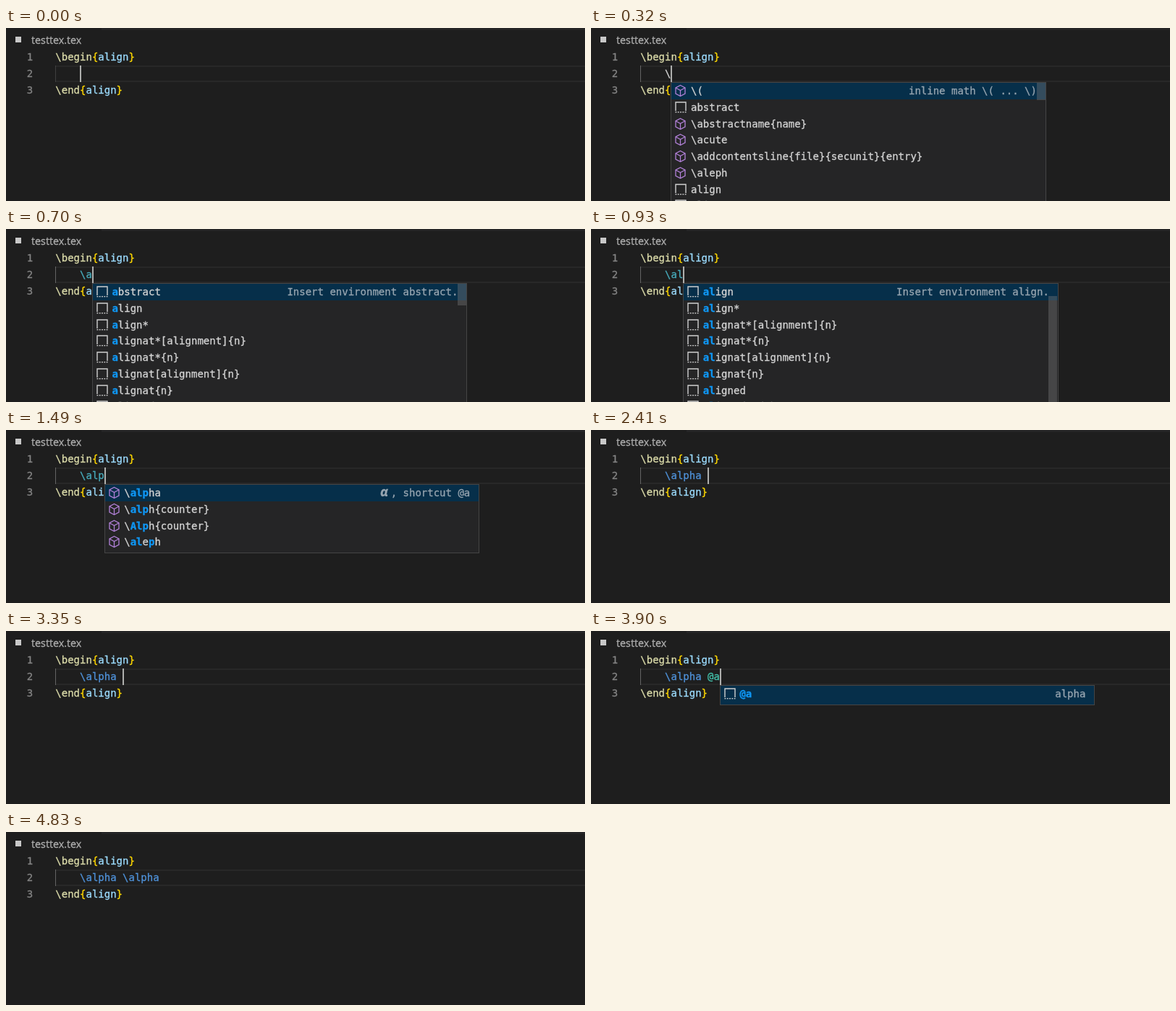
An HTML page with a canvas that plays this animation: 800x240 px, repeating every 4.91 s.

```html
<!DOCTYPE html>
<html lang="en">
<head>
<meta charset="utf-8">
<title>LaTeX completion</title>
<style>
  html, body { margin: 0; width: 800px; height: 240px; overflow: hidden; background: #1e1e1e; }
  canvas { display: block; }
</style>
</head>
<body>
<canvas id="stage" width="800" height="240"></canvas>
<script>
const ctx = document.getElementById('stage').getContext('2d');
const LOOP = 4910, ADV = 8.43, LEFT = 68.6, PITCH = 22.75;
const MONO = '14px "DejaVu Sans Mono", monospace';
const CMD = '#dcdcaa', BRACE = '#ffd700', NAME = '#9cdcfe';
const PLAIN = '#d4d4d4', TEAL = '#47acbc', BLUE = '#4f92da', MINT = '#43c3ac';

const colX = col => LEFT + col * ADV;

// Rows starting with a backslash get the cube icon, others the snippet icon.
const envs = ['align', 'align*', 'alignat*[alignment]{n}', 'alignat*{n}',
  'alignat[alignment]{n}', 'alignat{n}', 'aligned', 'alignedat{n}'];
const greek = ['\\alpha', '\\alph{counter}', '\\Alph{counter}', '\\aleph'];
const shortcut = ', shortcut @a';

const all = { col: 5, query: '', detail: 'inline math \\( ... \\)', slider: [76, 24],
  rows: ['\\(', 'abstract', '\\abstractname{name}', '\\acute',
    '\\addcontentsline{file}{secunit}{entry}', '\\aleph', 'align', 'align*'] };
const listA = { col: 6, query: 'a', detail: 'Insert environment abstract.', slider: [76, 30],
  rows: ['abstract', ...envs.slice(0, 7)] };
const listAl = { col: 7, query: 'al', detail: 'Insert environment align.', slider: [93, 147], rows: envs };
const listAlp = { col: 8, query: 'alp', detail: shortcut, alpha: true, rows: greek };
const listAlph = { ...listAlp, col: 9, query: 'alph' };
const listAlpha = { ...listAlp, col: 10, query: 'alpha', rows: ['\\alpha'] };
const listAt = { col: 13, query: '@a', detail: 'alpha', rows: ['@a'] };

// [start time, typed parts, popup, cursor visible]
const states = [
  [0, [], null, true],
  [150, [['\\', PLAIN]], null, true],
  [240, [['\\', PLAIN]], { ...all, detail: '' }, true],
  [320, [['\\', PLAIN]], all, true],
  [700, [['\\a', TEAL]], listA, true],
  [930, [['\\al', TEAL]], listAl, true],
  [1400, [['\\alp', TEAL]], listAl, true],
  [1490, [['\\alp', TEAL]], listAlp, true],
  [1800, [['\\alph', TEAL]], listAlph, true],
  [1950, [['\\alpha', BLUE]], listAlph, true],
  [2030, [['\\alpha', BLUE]], listAlpha, true],
  [2410, [['\\alpha ', BLUE]], null, true],
  [2880, [['\\alpha ', BLUE]], null, false],
  [3350, [['\\alpha ', BLUE]], null, true],
  [3580, [['\\alpha ', BLUE], ['@', MINT]], null, true],
  [3900, [['\\alpha ', BLUE], ['@a', MINT]], listAt, true],
  [4360, [['\\alpha \\alpha', BLUE]], null, true],
  [4830, [['\\alpha \\alpha', BLUE]], null, false]
];

function box(x, y, w, h, color) {
  ctx.fillStyle = color;
  ctx.fillRect(x, y, w, h);
}

// A hairline outline gives the letters a medium weight.
function text(str, x, y, color, font = MONO, align = 'left') {
  ctx.font = font;
  ctx.textAlign = align;
  ctx.fillStyle = ctx.strokeStyle = color;
  ctx.lineWidth = .3;
  ctx.fillText(str, x, y);
  ctx.strokeText(str, x, y);
}

function codeLine(parts, col, y) {
  for (const [str, color] of parts) {
    text(str, colX(col) - .3, y, color);
    col += str.length;
  }
  return col;
}

function line(points, color, width) {
  ctx.strokeStyle = color;
  ctx.lineWidth = width;
  ctx.beginPath();
  points.forEach(([x, y]) => ctx.lineTo(x, y));
  ctx.stroke();
}

function cubeIcon(x, y) {
  const color = '#b180d7', w = 6.5;
  line([[x, y - 7.5], [x + w, y - 4], [x + w, y + 4], [x, y + 7.5],
    [x - w, y + 4], [x - w, y - 4], [x, y - 7.5], [x + w, y - 4]], color, 1.3);
  line([[x - w, y - 4], [x, y - .5], [x + w, y - 4]], color, 1.3);
  line([[x, y - .5], [x, y + 7.5]], color, 1.3);
}

function snippetIcon(x, y) {
  const color = '#d0d0d0';
  line([[x - 6.5, y + 5], [x - 6.5, y - 7], [x + 7.5, y - 7], [x + 7.5, y + 5]], color, 1.4);
  for (let i = 0; i < 5; i++) box(x - 7 + i * 3.3, y + 6, 1.8, 1.4, color);
}

function label(str, query, x, y) {
  let hit = 0;
  [...str].forEach((ch, i) => {
    const match = hit < query.length && ch.toLowerCase() === query[hit];
    if (match) hit++;
    text(ch, x + i * ADV, y, match ? '#0f97f5' : PLAIN, match ? 'bold ' + MONO : MONO);
  });
}

function popup({ col, query, rows, detail, alpha, slider }) {
  const left = colX(col), x = Math.floor(left), right = Math.floor(left + 518.4);
  const n = rows.length, bottom = n === 1 ? 103 : n === 4 ? 171 : 260;
  box(x, 75, right - x, bottom - 75, '#454545');
  box(x + 1, 76, right - x - 2, bottom - 77, '#252526');
  box(x + 1, 76, right - x - 2, n === 1 ? 26 : 23, '#062f4a');
  rows.forEach((row, i) => {
    const y = Math.round(87 + i * PITCH);
    (row[0] === '\\' ? cubeIcon : snippetIcon)(x + 13.5, y);
    label(row, query, left + 27.2, y + 5);
  });
  text(detail, left + 505.2, 92, '#97a5b0', MONO, 'right');
  if (alpha) text('α', x + 381, 92, '#97a5b0', 'italic 600 18px "Noto Sans", sans-serif');
  if (slider) box(Math.floor(left + 505.3), slider[0], 12, slider[1], 'rgba(121,121,121,.4)');
}

function draw(t) {
  const [start, typed, list, cursor] = states.findLast(s => s[0] <= t);
  box(0, 0, 800, 240, '#1e1e1e');
  box(132, 0, 668, 3, '#252526');
  box(13, 12, 8, 8, '#c8c8c8');
  text('testtex.tex', 35, 22, '#adadad', '14.3px "Open Sans", sans-serif');

  box(68, 52, 732, 23, '#282828');
  box(68, 54, 732, 19, '#1e1e1e');
  box(68, 52, 1, 23, start ? '#646464' : '#404040');
  for (let i = 0; i < 3; i++) text(i + 1, 37.2, 45 + 23 * i, '#858585', MONO, 'right');

  const env = [['{', BRACE], ['align', NAME], ['}', BRACE]];
  codeLine([['\\begin', CMD], ...env], 0, 45);
  codeLine([['\\end', CMD], ...env], 0, 91);
  const end = codeLine(typed, 4, 68);
  if (cursor) box(Math.floor(colX(end)), 52, 2, 23, '#aeafad');
  if (list) popup(list);
}

function tick(now) {
  draw(now % LOOP);
  requestAnimationFrame(tick);
}
draw(0);
requestAnimationFrame(tick);
</script>
</body>
</html>
```
